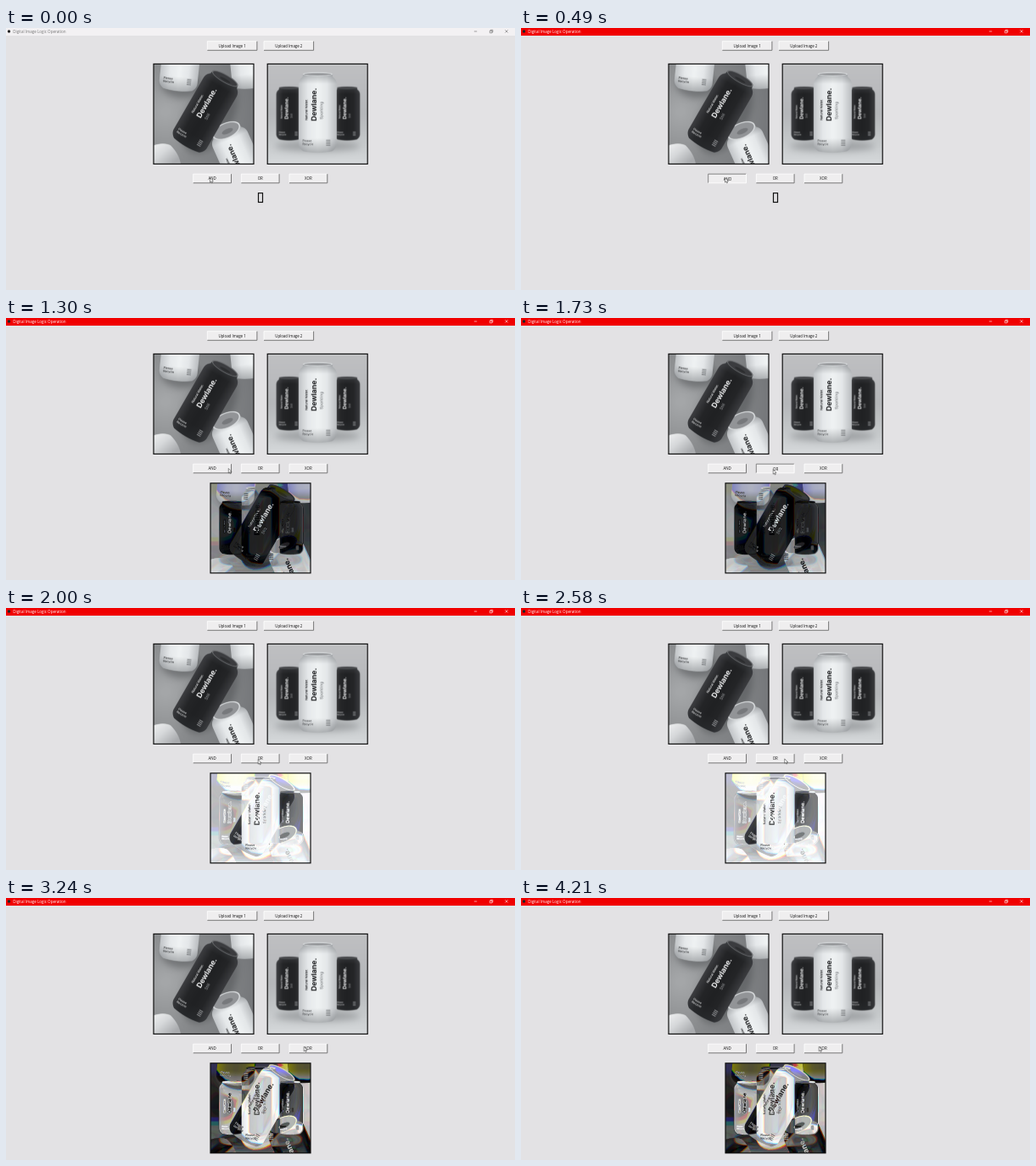
Animation, 600 px wide and 309 px high, one loop 4.24 s. Source, as an HTML page with a canvas:

```html
<!DOCTYPE html>
<html lang="en">
<head>
<meta charset="utf-8">
<title>Digital Image Logic Operation</title>
<style>
  html, body { margin: 0; width: 100%; height: 100%; overflow: hidden; background: #e3e2e4; }
  canvas, svg { position: absolute; left: 0; top: 0; width: 600px; height: 309px; }
  .ui { font: 4.4px "Open Sans", "Noto Sans", sans-serif; }
</style>
</head>
<body>
<canvas id="pictures"></canvas>
<svg viewBox="0 0 600 309">
  <g id="bar" class="ui"></g>
  <g id="buttons" class="ui"></g>
  <g id="frames" fill="none" stroke="#111" stroke-width="1.2"></g>
  <path id="cursor" d="M0 0V5.4L1.3 4.3L2.1 6.2L3 5.8L2.2 4H3.8Z" fill="#fff" stroke="#222" stroke-width=".5"/>
</svg>
<script>
const LOOP = 4240;
const SIZE = 118, DETAIL = 4;
const $ = id => document.getElementById(id);

function surface() {
  const canvas = document.createElement('canvas');
  canvas.width = canvas.height = SIZE * DETAIL;
  return canvas.getContext('2d');
}

function gradient(g, [x0, y0, x1, y1], ...colors) {
  const fill = g.createLinearGradient(x0, y0, x1, y1);
  colors.forEach((c, i) => fill.addColorStop(i / (colors.length - 1), c));
  return fill;
}

function ellipse(g, x, y, rx, ry, fill, turn = 0) {
  g.beginPath();
  g.ellipse(x, y, rx, ry, turn, 0, 7);
  g.fillStyle = fill;
  g.fill();
}

function write(g, text, x, y, size, fill, { weight = 400, up = false } = {}) {
  g.save();
  g.translate(x, y);
  if (up) g.rotate(-Math.PI / 2);
  g.font = `${weight} ${size}px Inter, Roboto, sans-serif`;
  g.fillStyle = fill;
  g.fillText(text, 0, 0);
  g.restore();
}

const body = new Path2D('M-17-46H17L18-42Q22.5-39 22.5-33V37Q22 42 17 45.5Q0 49-17 45.5Q-22 42-22.5 37V-33Q-22.5-39-18-42Z');

// One drink can, 45 by 94, centred on its own origin
function can(g, x, y, { turn = 0, scale = 1, dark = false, lid = 1.3, label = true, flavour = 'Still' } = {}) {
  g.save();
  g.translate(x, y);
  g.rotate(turn * Math.PI / 180);
  g.scale(scale, scale);

  g.fillStyle = dark
    ? gradient(g, [-22, 0, 22, 0], '#3c3d40', '#242527', '#202123', '#242527', '#3a3b3e')
    : gradient(g, [-22, 0, 22, 0], '#c3c6c9', '#e6e9eb', '#eff2f3', '#e4e7e9', '#bcbfc2');
  g.fill(body);
  g.fillStyle = gradient(g, [0, 30, 0, 48], 'rgba(50,54,58,0)', 'rgba(50,54,58,.35)');
  g.fill(body);
  g.fillStyle = gradient(g, [0, -46, 0, -34], 'rgba(80,84,88,.4)', 'rgba(80,84,88,0)');
  g.fill(body);

  ellipse(g, 0, -45.5, 17.5, lid + .9, dark ? '#6c6e71' : '#dcdfe1');
  ellipse(g, 0, -45.3, 16, lid, dark ? '#3b3c3f' : '#929497');
  if (lid > 3) ellipse(g, 1, -44, 7, lid * .35, dark ? '#2c2d2f' : '#77797c');

  if (label) {
    const ink = dark ? '#f0f1f2' : '#1c1d1f', faint = dark ? '#a5a7aa' : '#65686b';
    write(g, 'Natural Water.', -12, 9, 3.7, ink, { weight: 500, up: true });
    write(g, 'Dewlane.', -1.4, 10, 8.6, ink, { weight: 700, up: true });
    write(g, flavour, 6, 8, 4.7, faint, { up: true });
    write(g, 'Please', -18, 34.5, 3.5, ink);
    write(g, 'Recycle', -18, 38.3, 3.5, ink);
    g.fillStyle = faint;
    for (let i = 0; i < 4; i++) g.fillRect(10, 32 + i * 2, 5, .8);
  }
  g.restore();
}

function shadow(g, x, y, rx, ry, alpha, turn = 0) {
  g.filter = `blur(${4 * DETAIL}px)`;
  ellipse(g, x, y, rx, ry, `rgba(60,63,66,${alpha})`, turn);
  g.filter = 'none';
}

function scene(paint) {
  const g = surface();
  g.scale(DETAIL, DETAIL);
  paint(g);
  return g;
}

const one = scene(g => {
  const floor = g.createRadialGradient(14, 56, 5, 14, 56, 105);
  floor.addColorStop(0, '#a4a6a8');
  floor.addColorStop(.5, '#8b8d8f');
  floor.addColorStop(1, '#75777a');
  g.fillStyle = floor;
  g.fillRect(0, 0, SIZE, SIZE);
  shadow(g, 33, 24, 24, 16, .4);
  shadow(g, 66, 62, 27, 48, .4, .5);
  can(g, 33, -15, { turn: 6 });
  can(g, 111, -18, { turn: -6, label: false });

  g.fillStyle = gradient(g, [0, 92, 22, 118], '#f2f3f4', '#d6d8da', '#a9abae');
  g.fill(new Path2D('M0 96Q12 92 20 96Q30 106 32 118H0Z'));
  can(g, 104, 120, { turn: -24, lid: 8 });
  can(g, 61.5, 56.5, { turn: 30, dark: true, lid: 4 });
});

const two = scene(g => {
  g.fillStyle = gradient(g, [0, 0, 0, SIZE], '#bfc0c2', '#babbbe', '#b5b7ba', '#c4c7c9', '#d6d9db');
  g.fillRect(0, 0, SIZE, SIZE);
  shadow(g, 59, 97, 50, 6, .3);
  g.filter = 'blur(1.5px)';
  for (const x of [25.5, 94]) can(g, x, 58.5, { scale: .67, dark: true });
  g.filter = 'none';
  can(g, 59.2, 57.5, { flavour: 'Sparkling' });
});

// Bitwise blend of both scenes
function combine(op) {
  const px = SIZE * DETAIL, read = g => g.getImageData(0, 0, px, px);
  const a = read(one), b = read(two), g = surface();
  for (let i = 0; i < a.data.length; i++) {
    if (i % 4 < 3) a.data[i] = op(a.data[i], b.data[i]);
  }
  g.putImageData(a, 0, 0);
  return g;
}

const results = [(a, b) => a & b, (a, b) => a | b, (a, b) => a ^ b].map(combine);

const screen = $('pictures').getContext('2d');
const ratio = window.devicePixelRatio || 1;
screen.canvas.width = 600 * ratio;
screen.canvas.height = 309 * ratio;
screen.scale(ratio, ratio);
screen.imageSmoothingQuality = 'high';

// Draws a picture cropped evenly at top and bottom to the given height
function place(g, x, y, h = SIZE) {
  const cut = (SIZE - h) / 2;
  screen.drawImage(g.canvas, 0, cut * DETAIL, SIZE * DETAIL, h * DETAIL, x, y, SIZE, h);
}

const frame = (x, y, w, h, id = '') => `<rect id="${id}" x="${x}" y="${y}" width="${w}" height="${h}"/>`;
$('frames').innerHTML =
  frame(174, 42.4, SIZE, SIZE, 'first') + frame(308.2, 42.4, SIZE, SIZE, 'second') +
  frame(297.5, 194.7, 5, 10.8, 'empty') + frame(241, 194.8, SIZE, 106, 'result');

$('bar').innerHTML = `
  <rect width="600" height="9" fill="#f3f1f3"/>
  <rect id="red" width="600" height="9" fill="#f00000"/>
  <circle cx="3.5" cy="4" r="1.7" fill="#222"/>
  <text id="caption" x="8.2" y="5.9" font-size="4.55">Digital Image Logic Operation</text>
  <path id="controls" d="M551.8 4h3.4M570.3 3.2h2.6v2.6h-2.6zM571.2 3.2v-.9h2.6v2.6h-.9M588.4 2.3l3.2 3.2M591.6 2.3l-3.2 3.2" fill="none" stroke-width=".6"/>`;

function button(x, y, w, text) {
  const h = 10.6;
  return `<g>
    <rect x="${x}" y="${y}" width="${w}" height="${h}" fill="#efeeef"/>
    <path d="M${x} ${y + h}V${y}H${x + w}" fill="none" stroke-width=".8"/>
    <path d="M${x} ${y + h}H${x + w}V${y}" fill="none" stroke-width=".9"/>
    <text x="${x + w / 2}" y="${y + 7}" text-anchor="middle" fill="#111">${text}</text>
  </g>`;
}

$('buttons').innerHTML =
  button(237.3, 15.7, 58.6, 'Upload Image 1') + button(304, 15.7, 58.6, 'Upload Image 2') +
  button(220.7, 172.2, 44.8, 'AND') + button(277.3, 172.2, 44.8, 'OR') + button(334, 172.2, 44.8, 'XOR');
const buttons = [...$('buttons').children];

function setPressed(el, down) {
  const [top, bottom] = el.querySelectorAll('path');
  top.setAttribute('stroke', down ? '#6b6b6b' : '#fff');
  bottom.setAttribute('stroke', down ? '#fff' : '#6b6b6b');
  el.querySelector('text').setAttribute('transform', down ? 'translate(.4 .4)' : '');
}

const clamp = v => Math.max(0, Math.min(1, v));
const ease = (t, from, to) => {
  const p = clamp((t - from) / (to - from));
  return p * p * (3 - 2 * p);
};
// When each operation is pressed and released
const presses = [[420, 670], [1730, 2000], [2970, 3210]];

function draw(t) {
  const active = t < 420 ? 0 : clamp((t - 385) / 100);
  $('red').setAttribute('opacity', active);
  $('caption').setAttribute('fill', active ? '#fff' : '#777');
  $('controls').setAttribute('stroke', active ? '#fff' : '#666');

  buttons.forEach((el, i) => {
    const span = presses[i - 2];
    setPressed(el, !!span && t >= span[0] && t < span[1]);
  });

  const shown = presses.filter(span => t >= span[1]).length - 1;
  $('empty').style.display = shown < 0 ? '' : 'none';
  $('result').style.display = shown < 0 ? 'none' : '';
  screen.clearRect(0, 0, 600, 309);
  place(one, 174, 42.4);
  place(two, 308.2, 42.4);
  if (shown >= 0) place(results[shown], 241, 194.8, 106);

  const a = ease(t, 1090, 1590), b = ease(t, 2460, 2830);
  $('cursor').setAttribute('transform', `translate(${240.5 + 56.7 * a + 54 * b} ${176.7 + 2 * a - 3.4 * b})`);
}

const start = performance.now();
function tick() {
  draw((performance.now() - start) % LOOP);
  requestAnimationFrame(tick);
}
tick();
</script>
</body>
</html>
```
